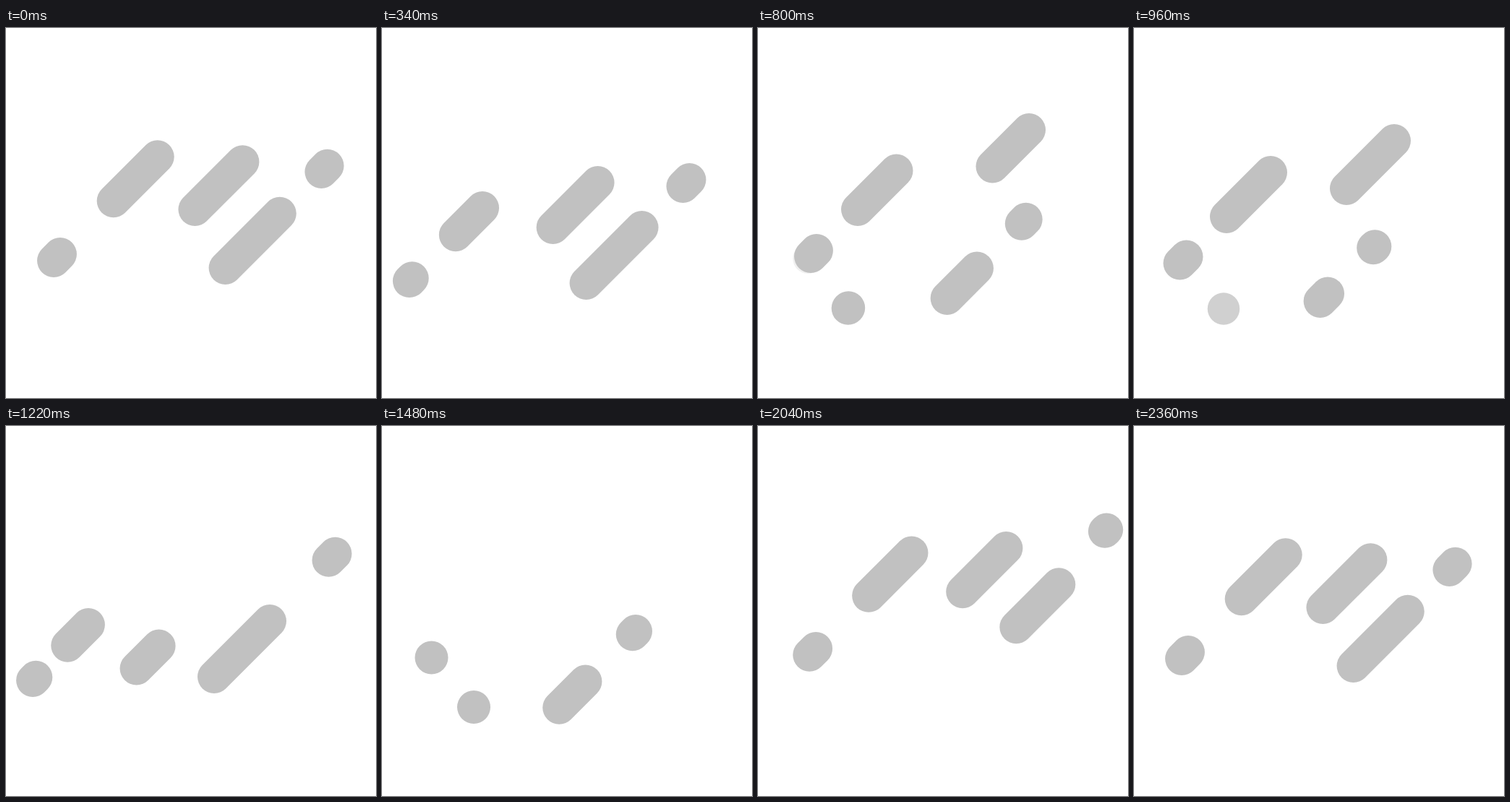
Recreate the animation shown at these times as an HTML page with a canvas. Size 512x512 px, loop 2.4 s.

```html
<!DOCTYPE html>
<html lang="en">
<head>
<meta charset="utf-8">
<title>Drifting capsules</title>
<style>
  html, body { margin: 0; height: 100%; overflow: hidden; background: #fff; }
  canvas { display: block; width: 100vmin; height: 100vmin; }
</style>
</head>
<body>
<canvas width="512" height="512"></canvas>
<script>
const ctx = document.querySelector('canvas').getContext('2d');
const LOOP = 2400, HOLD = 20, TRAVEL = 2340, RADIUS = 23;
const clamp = (v, lo = 0, hi = 1) => Math.min(hi, Math.max(lo, v));
const smooth = u => u * u * (3 - 2 * u);

// Five capsules on three diagonal lanes; reach is the distance covered while arriving.
const capsules = [
  { lane: 0, reach: 112, stretch: 9 },
  { lane: 0, reach: 78, stretch: 61 },
  { lane: 1, reach: 162, stretch: 66 },
  { lane: 2, reach: 138, stretch: 77 },
  { lane: 2, reach: 72, stretch: 9 },
];

// Each wave: when the capsules start, leave and vanish, and where they pause and stop.
const waves = [
  {
    lanes: [388, 512.5, 635.5], reach: 1, exit: 650,
    start: [1600, 1600, 1640, 1720, 1980],
    leave: [2270, 2340, 2518, 2772, 2818],
    gone: [2960, 3160, 3360, 3480, 3500],
    pause: [73, 179.5, 294, 320, 419],
    stop: [25, 69, 124, 257, 315],
  },
  {
    lanes: [389, 516, 635], reach: .5, exit: 430,
    start: [690, 690, 730, 980, 1070],
    leave: [960, 960, 960, 1220, 1220],
    gone: [1480, 1820, 1820, 1820, 1820],
    pause: [68, 158.5, 327, 326.5, 451],
    stop: [24, 68.5, 127, 230, 295],
  },
];

function drawCapsule(wave, i, t) {
  const { lane, reach, stretch } = capsules[i];
  const alpha = clamp(Math.min((t - wave.start[i]) / 60, (wave.gone[i] - t) / 80));
  if (!alpha) return;

  // Decelerate and lengthen up to the pause, then slide off and contract.
  const left = 1 - clamp((t - wave.start[i]) / (wave.leave[i] - wave.start[i]));
  const out = smooth(clamp((t - wave.leave[i]) / wave.exit));
  const x = wave.pause[i] + reach * wave.reach * left ** (lane < 2 ? 3.5 : 2)
    + (wave.stop[i] - wave.pause[i]) * out;
  const y = wave.lanes[lane] - x - .24 * Math.max(0, x - 440);
  const half = Math.max(.01, stretch * (1 - left ** 4) * (1 - out ** 1.5) / 2);

  ctx.globalAlpha = alpha;
  ctx.lineWidth = 2 * (RADIUS - 3 * (1 - alpha));
  ctx.beginPath();
  ctx.moveTo(x - half, y + half);
  ctx.lineTo(x + half, y - half);
  ctx.stroke();
}

ctx.lineCap = 'round';
ctx.strokeStyle = '#c1c1c1';

function frame() {
  const step = Math.floor(performance.now() % LOOP / 20) * 20;
  const t = clamp(step, HOLD, HOLD + TRAVEL);
  ctx.clearRect(0, 0, 512, 512);
  for (const wave of waves) {
    capsules.forEach((_, i) => {
      drawCapsule(wave, i, t);
      if (t < HOLD + TRAVEL) drawCapsule(wave, i, t + TRAVEL);
    });
  }
  requestAnimationFrame(frame);
}
frame();
</script>
</body>
</html>
```
